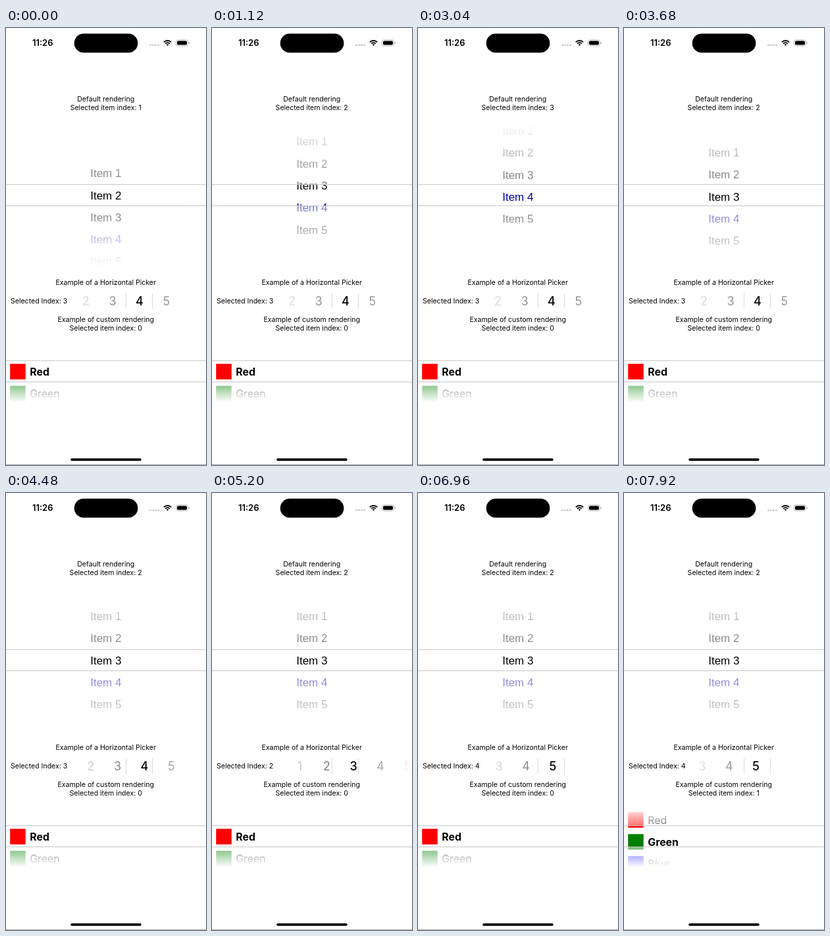
These frames come from a looping animation (304 px wide and 660 px high, 8000 ms). An HTML page with a canvas:

```html
<!DOCTYPE html>
<html lang="en">
<head>
<meta charset="utf-8">
<title>Wheel pickers</title>
<style>
  html, body { margin: 0; width: 100%; height: 100%; overflow: hidden; background: #fff; }
  canvas { display: block; width: 304px; height: 660px; }
</style>
</head>
<body>
<canvas id="stage"></canvas>
<script>
const W = 304, H = 660, LOOP = 8000, TICK = 80;
const SANS = 'Inter, sans-serif';
const ARIAL = '"Liberation Sans", Arial, sans-serif';
const LINE = '#c8c8c8';

const canvas = document.getElementById('stage');
const ctx = canvas.getContext('2d');
const dpr = window.devicePixelRatio || 1;
canvas.width = W * dpr;
canvas.height = H * dpr;

// Each move is [first tick, last tick, row]; without a row the wheel snaps to the nearest one.
const itemMoves = [
  [480, 480, 1.1], [800, 1120, 2.435], [1440, 2080, 3.36], [2320, 2720],
  [3040, 3040, 2.925], [3280, 3440, 1.72], [3600, 3920]
];
const numberMoves = [
  [4480, 4480, 2.816], [4960, 5360, 1.66], [5520, 6000],
  [6240, 6560, 3.57], [6720, 7440, 4.06]
];
const colorMoves = [[7600, 7600, 0.04], [7920, 7920, 0.76]];

const colors = [['Red', '#f00'], ['Green', '#008000'], ['Blue', '#00f']];

const easeOut = p => 1 - (1 - p) ** 3;

function scroll(pos, moves, t) {
  for (const [first, last, row = Math.round(pos)] of moves) {
    if (t < first) break;
    const p = Math.min(1, (t - first + TICK) / (last - first + TICK));
    pos += (row - pos) * easeOut(p);
  }
  return pos;
}

const selected = pos => Math.floor(pos + 0.4);

function text(str, x, y, font, color = '#000', align = 'center') {
  ctx.font = font;
  ctx.fillStyle = color;
  ctx.textAlign = align;
  ctx.fillText(str, x, y);
}

const label = (str, y, x = 151.7, align) =>
  text(str, x, y, `10.55px ${SANS}`, '#000', align);

function rect(x, y, w, h, color) {
  ctx.fillStyle = color;
  ctx.fillRect(x, y, w, h);
}

function pill(x, y, w, h, r, color) {
  ctx.beginPath();
  ctx.roundRect(x, y, w, h, r);
  ctx.fillStyle = color;
  ctx.fill();
}

function clipped(x, y, w, h, draw) {
  ctx.save();
  ctx.beginPath();
  ctx.rect(x, y, w, h);
  ctx.clip();
  draw();
  ctx.restore();
}

// White veil growing from the selection edge to the rim of the picker.
function veil(gradient, x, y, w, h) {
  gradient.addColorStop(0, 'rgba(255,255,255,.45)');
  gradient.addColorStop(1, '#fff');
  rect(x, y, w, h, gradient);
}

function wheel(top, bottom, lineA, lineB, draw) {
  const rim = (bottom - top) * 0.035;
  clipped(0, top, W, bottom - top, () => {
    draw();
    veil(ctx.createLinearGradient(0, lineA, 0, top + rim), 0, top, W, lineA - top);
    veil(ctx.createLinearGradient(0, lineB, 0, bottom - rim), 0, lineB + 1, W, bottom - lineB);
  });
  rect(0, lineA, W, 1, LINE);
  rect(0, lineB, W, 1, LINE);
}

function itemPicker(pos) {
  label('Default rendering', 111);
  label('Selected item index: ' + selected(pos), 124.3);
  wheel(136, 369, 236, 268, () => {
    for (let i = 0; i < 5; i++) {
      const y = 253 + (i - pos) * 33.3;
      text('Item ' + (i + 1), 151.8, y + 5.5, `17px ${ARIAL}`, i === 3 ? '#0000aa' : '#000');
    }
  });
}

function numberPicker(pos) {
  const current = selected(pos);
  label('Example of a Horizontal Picker', 388.3);
  label('Selected Index: ' + current, 416, 7, 'left');
  clipped(100, 396, 204, 32, () => {
    for (let i = 0; i < 5; i++) {
      const weight = i === current ? 500 : 400;
      text(i + 1, 203 + (i - pos) * 40.85, 418.8, `${weight} 18px ${SANS}`);
    }
    veil(ctx.createLinearGradient(182, 0, 100, 0), 100, 396, 82, 32);
    veil(ctx.createLinearGradient(223, 0, 305, 0), 223, 396, 82, 32);
  });
  rect(182, 401, 1, 23, '#dcdcdc');
  rect(222, 401, 1, 23, '#dcdcdc');
}

function colorPicker(pos) {
  const current = selected(pos);
  label('Example of custom rendering', 443.8);
  label('Selected item index: ' + current, 457);
  wheel(469, 569, 502, 534, () => {
    colors.forEach(([name, color], i) => {
      const y = 519 + (i - pos) * 33.2;
      rect(6.2, y - 11.8, 23.5, 23.5, color);
      text(name, 36.3, y + 5.8, `${i === current ? 700 : 400} 15.8px ${SANS}`, '#000', 'left');
    });
  });
}

function wifi(x, y) {
  const wedge = r => ctx.arc(x, y, r, -Math.PI * 0.75, -Math.PI * 0.25);
  ctx.strokeStyle = ctx.fillStyle = '#000';
  ctx.lineWidth = 1.9;
  for (const r of [8, 4.8]) {
    ctx.beginPath();
    wedge(r);
    ctx.stroke();
  }
  ctx.beginPath();
  ctx.moveTo(x, y);
  wedge(2.7);
  ctx.fill();
}

function battery(x, y) {
  ctx.beginPath();
  ctx.roundRect(x, y, 18, 9, 3);
  ctx.strokeStyle = '#a6a6a6';
  ctx.lineWidth = 0.8;
  ctx.stroke();
  pill(x + 1.5, y + 1.5, 15, 6, 1.8, '#000');
  pill(x + 19.2, y + 3, 1.1, 3, 0.6, '#a6a6a6');
}

function statusBar() {
  text('11:26', 55.7, 27.3, `600 13px ${SANS}`);
  pill(103.7, 8.6, 96.7, 28.6, 14.3, '#000');
  for (let i = 0; i < 4; i++) pill(218 + i * 4, 24.8, 3, 2.2, 1, '#c4c4c4');
  wifi(245.5, 27);
  battery(258.5, 18);
}

function frame(now) {
  const t = Math.floor((now % LOOP) / TICK) * TICK;
  ctx.setTransform(dpr, 0, 0, dpr, 0, 0);
  rect(0, 0, W, H, '#fff');
  statusBar();
  itemPicker(scroll(1, itemMoves, t));
  numberPicker(scroll(3, numberMoves, t));
  colorPicker(scroll(0, colorMoves, t));
  pill(98.2, 649.9, 107.5, 3.8, 1.9, '#000');
  rect(0, 659, W, 1, '#a8a8a8');
}

const start = performance.now();
function loop() {
  frame(performance.now() - start);
  requestAnimationFrame(loop);
}
loop();
</script>
</body>
</html>
```
